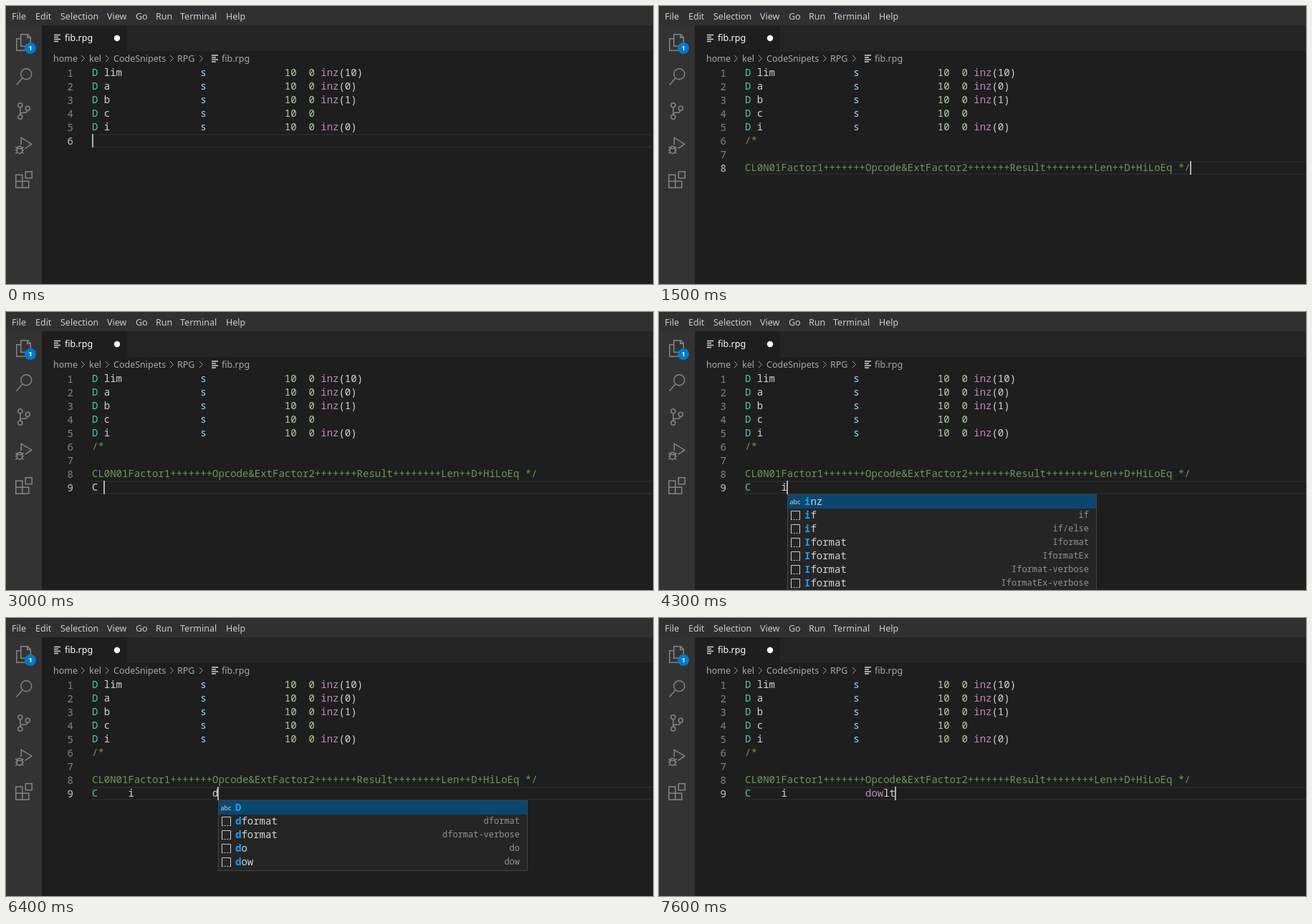
Recreate the animation shown at these times as an HTML page. Size 903 by 389 pixels, loop 8 s.

```html
<!DOCTYPE html>
<html lang="en">
<head>
<meta charset="utf-8">
<title>Typing fixed-form RPG</title>
<style>
html, body { margin: 0; width: 100%; height: 100%; overflow: hidden; background: #1e1e1e; }
svg { display: block; }
text { white-space: pre; }
.ui { font: 12.5px "Noto Sans", sans-serif; fill: #ccc; }
.code { font: 14px "Noto Sans Mono", monospace; fill: #d4d4d4; }
.detail { font-size: 12px; fill: #929292; text-anchor: end; }
.icon { fill: none; stroke: #858585; stroke-width: 1.5; }
</style>
</head>
<body>
<svg width="903" height="389" viewBox="0 0 903 389">
  <rect width="903" height="27" fill="#303031"/>
  <rect y="27" width="50" height="362" fill="#333"/>
  <rect x="50" y="27" width="853" height="36" fill="#252526"/>
  <rect x="50" y="27" width="119" height="36" fill="#1e1e1e"/>
  <g id="labels" class="ui"></g>
  <circle cx="155" cy="45" r="4.2" fill="#fff"/>
  <g class="icon">
    <path transform="translate(13 39)" d="M7.75 .75h9.5l4 4v12.5H7.75zM16.75 1v4.25h4.5M7 6.75H1.75v16.5h13.5V18"/>
    <g transform="translate(13 87)"><circle cx="15.25" cy="8.25" r="7.5"/><path d="M9.8 14L1.6 23.4"/></g>
    <g transform="translate(13 135)">
      <circle cx="6.8" cy="3.75" r="3"/><circle cx="17.3" cy="8.2" r="3"/><circle cx="6.8" cy="20.2" r="3"/>
      <path d="M6.8 6.8V17.2Q7.5 14.2 10.5 14.2h3Q16.4 14.2 17 11.2"/>
    </g>
    <g transform="translate(13 183)">
      <path d="M8.25 11V1.3L22.8 10.2L13.5 16.4"/>
      <path d="M2.25 16.5h7.5v2.5a3.75 4.25 0 0 1-7.5 0zM3 16.2a3 3 0 0 1 6 0M.5 14L2.5 16.2M11.5 14L9.5 16.2M0 18.75h2M10 18.75h2M.5 23.5L2.8 21.3M11.5 23.5L9.2 21.3"/>
    </g>
    <path transform="translate(13 231)" d="M14.25 .75h9v9h-9zM.75 5.25h9v18h-9zM.75 14.25h18v9H.75z"/>
  </g>
  <circle cx="34" cy="59" r="8" fill="#007acc"/>
  <text x="34" y="62.3" text-anchor="middle" style="font:600 9px 'Noto Sans',sans-serif" fill="#fff">1</text>
  <g id="editor" class="code"></g>
</svg>
<script>
const LOOP = 8000, CHAR = 8.4, ROW = 19, LEFT = 120, TOP = 84;
const TEAL = "#4ec9b0", BLUE = "#9cdcfe", NUM = "#b5cea8", PINK = "#c586c0", GREEN = "#6a9955";
const $ = id => document.getElementById(id);
const esc = s => s.replace(/&/g, "&amp;").replace(/</g, "&lt;");
const text = (x, y, s, attrs = "") => `<text x="${x}" y="${y}" ${attrs}>${s}</text>`;
const span = (s, color) => `<tspan fill="${color}">${esc(s)}</tspan>`;
const rect = (x, y, w, h, fill, attrs = "") =>
  `<rect x="${x}" y="${y}" width="${w}" height="${h}" fill="${fill}" ${attrs}/>`;

// Window chrome
const fileIcon = x => y =>
  `<path d="M${x} ${y}h9m-9 3h6m-6 3h9m-9 3h6" stroke="#d4d7d6" stroke-width="1.4"/>`;
const menus = [[8, "File"], [41, "Edit"], [76, "Selection"], [141, "View"],
  [181, "Go"], [209, "Run"], [243, "Terminal"], [307, "Help"]];
const crumbs = [[66, "home"], [116, "kel"], [150, "CodeSnipets"], [239, "RPG"], [301, "fib.rpg"]];
$("labels").innerHTML =
  menus.map(([x, s]) => text(x, 19, s)).join("") +
  text(82, 49, "fib.rpg", 'fill="#fff"') +
  crumbs.map(([x, s]) => text(x, 78, s, 'fill="#a9a9a9"')).join("") +
  [105, 139, 229, 270].map(x =>
    `<path d="M${x} 69l4.5 4.5l-4.5 4.5" fill="none" stroke="#a0a0a0"/>`).join("") +
  fileIcon(67)(40.5) + fileIcon(287)(69);

// Code
const declarations = [["lim", "(10)"], ["a", "(0)"], ["b", "(1)"], ["c", ""], ["i", "(0)"]]
  .map(([name, init]) => span("D ", TEAL) + span(name.padEnd(16), "#d4d4d4") +
    span("s".padEnd(14), BLUE) + span("10  0 ", NUM) +
    (init && span("inz", PINK) + span(init, "#d4d4d4")));

function colorLine(line) {
  if (/^(\/|CL)/.test(line)) return span(line, GREEN);
  const spec = line.length >= 6 ? span(line.slice(0, 1), TEAL) : line.slice(0, 1);
  return spec + line.slice(1).replace(/dow?/, op => span(op, PINK));
}

// Suggestions: [label, detail]; words have no detail
const iSpecs = ["Iformat", "IformatEx", "Iformat-verbose", "IformatEx-verbose"];
const dSpecs = [["dformat", "dformat"], ["dformat", "dformat-verbose"]];
const loops = [["do", "do"], ["dow", "dow"]];
const lists = {
  slash: [["/*", "comment"], ["/**", "comment-verbose"]],
  c: [["c"], ["CL0N01Factor1"], ["cformat", "cformat"], ["cformat", "cformat-verbose"]],
  i: [["inz"], ["if", "if"], ["if", "if/else"], ...iSpecs.map(s => ["Iformat", s])],
  d: [["D"], ...dSpecs, ...loops],
  do: [...loops, ...dSpecs],
  dow: [["dow", "dow"]]
};

function markMatches(label, word) {
  let n = 0;
  return [...label].map(ch => n < word.length && ch.toLowerCase() === word[n].toLowerCase()
    ? (n++, `<tspan fill="#18a3ff" font-weight="700">${ch}</tspan>`) : ch).join("");
}

function popup(x, y, items, word) {
  const rows = items.map(([label, detail], i) => {
    const top = y + 1 + i * ROW;
    const icon = detail
      ? `<path d="M${x + 5.5} ${top + 16}V${top + 3.5}h12V${top + 16}" fill="none" stroke="#ccc"/>` +
        `<path d="M${x + 5} ${top + 15.5}h13" stroke="#ccc" stroke-dasharray="2 1.7"/>`
      : text(x + 3.5, top + 13, "abc", `style="font:9px 'Noto Sans',sans-serif"`);
    return (i ? "" : rect(x + 1, top, 430, ROW, "#094771")) + icon +
      text(x + 24, top + 14, markMatches(label, word)) +
      (detail ? text(x + 421, top + 13, detail, 'class="detail"') : "");
  });
  return rect(x + .5, y + .5, 431, items.length * ROW + 3, "#252526", 'stroke="#454545"') + rows.join("");
}

// Timeline: [time, text below the declarations, list, columns the list lags behind the caret]
const head = "/*\n\nCL0N01Factor1+++++++Opcode&ExtFactor2+++++++Result++++++++Len++D+HiLoEq */";
const calc = (cols, op = "") => head + "\n" + (cols > 6 ? "C     i" : "C").padEnd(cols) + op;
const steps = [
  [0, ""], [500, "/"], [600, "/", "slash"], [1100, "/*", "slash", 1], [1200, "/*", "slash"],
  [1500, head], [2000, head + "\n"], [2600, calc(1)], [2700, calc(1), "c"],
  [3000, calc(2)], [3200, calc(3)], [3400, calc(4)], [3500, calc(5)], [4000, calc(6)],
  [4300, calc(7), "i"], [4600, calc(8)], [5100, calc(12)], [5200, calc(15)], [5300, calc(16)],
  [5500, calc(17)], [5600, calc(18)], [5800, calc(19)], [6000, calc(20)],
  [6400, calc(20, "d"), "d"], [6600, calc(20, "do"), "do"], [6900, calc(20, "dow"), "dow"],
  [7300, calc(20, "dowl")], [7600, calc(20, "dowlt")]
];

function render([, typed, list, lag = 0]) {
  const lines = typed.split("\n"), last = lines[lines.length - 1];
  const all = [...declarations, ...lines.map(colorLine)];
  const active = all.length - 1, y = TOP + active * ROW;
  const caret = Math.max(LEFT, Math.round(LEFT + last.length * CHAR) - 1);
  let out = rect(LEFT + 1, y + 1, 800, ROW - 2, "none", 'stroke="#282828" stroke-width="2"');
  all.forEach((line, i) => {
    const top = TOP + i * ROW;
    out += text(94, top + 15, i + 1, `text-anchor="end" fill="${i === active ? "#c6c6c6" : "#858585"}"`) +
      text(LEFT, top + 14, line);
  });
  out += rect(caret, y, 2, ROW, "#aeafad");
  if (list) {
    const x = Math.round(LEFT + (last.length - lag) * CHAR);
    out += popup(x, y + ROW, lists[list], last.match(/\S*$/)[0]);
  }
  $("editor").innerHTML = out;
}

let shown;
const start = performance.now();
function tick() {
  const t = (performance.now() - start) % LOOP;
  const step = steps.filter(s => s[0] <= t).pop();
  if (step !== shown) render(shown = step);
  requestAnimationFrame(tick);
}
tick();
</script>
</body>
</html>
```
